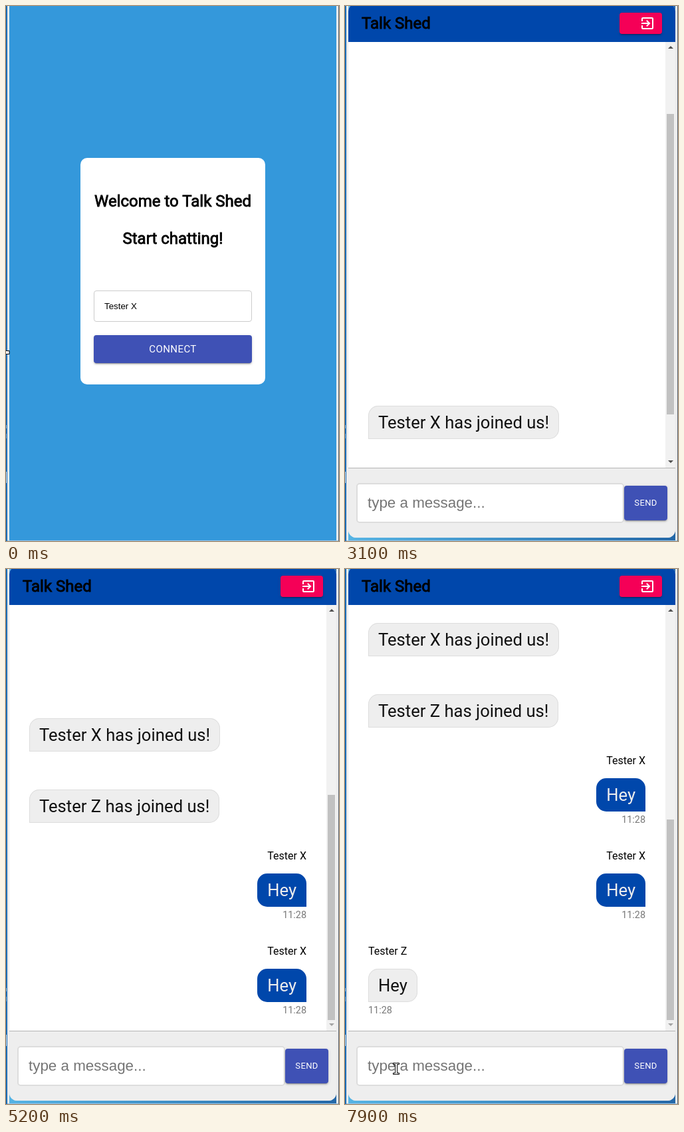
Recreate the animation shown at these times as an HTML page. Size 501 px wide and 803 px high, loop 8000 ms.

```html
<!DOCTYPE html>
<html lang="en">
<head>
<meta charset="utf-8">
<title>Chat demo</title>
<style>
html, body { margin: 0; width: 100%; height: 100%; overflow: hidden; }
#stage { position: relative; width: 501px; height: 803px; overflow: hidden; background: #ececec; font: 16px Roboto, sans-serif; color: #000; }
#stage div, #stage svg { position: absolute; box-sizing: border-box; white-space: pre; }
.page { left: 5px; top: 0; width: 492px; height: 802px; overflow: hidden; }
#welcome { background: #3498db; }
#chat { background: linear-gradient(90deg, #56b4e4, #2468a8); }
.card { left: 107px; top: 228px; width: 278px; height: 340px; border-radius: 10px; background: #fff; }
.head { font-size: 24px; line-height: 28px; -webkit-text-stroke: .85px #000; }
.card .head { width: 100%; text-align: center; }
.field { left: 20px; top: 199px; width: 238px; height: 47px; border: 1px solid #ccc; border-radius: 4px; padding-left: 15px; font: 13.33px/45px "Liberation Sans", Arial, sans-serif; }
.btn { border-radius: 4px; background: #3f51b5; color: #fff; text-align: center; letter-spacing: .02857em;
  box-shadow: 0 3px 1px -2px #0003, 0 2px 2px #00000024, 0 1px 5px #0000001f; }
.btn.hover { box-shadow: 0 2px 4px -1px #0003, 0 4px 5px #00000024, 0 1px 10px #0000001f; }
#connect { left: 20px; top: 266px; width: 238px; height: 42px; font-size: 15px; line-height: 42px; overflow: hidden; }
#ripple { left: 5px; top: -13px; width: 80px; height: 80px; border-radius: 50%; background: #ffffff2e; }
.app { left: 0; top: -4px; width: 492px; height: 802px; border-radius: 12px; overflow: hidden; background: #eee; }
.bar { left: 0; top: 0; width: 100%; height: 58px; background: #0047ab; }
.exit { left: 408px; top: 14px; width: 64px; height: 32px; background: #f50057; }
.view { left: 0; top: 58px; width: 100%; height: 639px; overflow: hidden; background: #fff; }
#list { left: 0; top: 0; width: 477px; }
.msg { left: 30px; }
.msg.own { left: auto; right: 30px; }
.msg div { left: 0; }
.msg.own div { left: auto; right: 0; }
.msg .bubble { position: relative !important; height: 50px; padding: 0 15px; font-size: 25.6px; line-height: 50px; color: #111; background: #eee; border-radius: 15px 15px 15px 0; box-shadow: inset 0 0 0 1px #ddd; }
.msg.own .bubble { color: #eee; background: #0047ab; border-radius: 15px 15px 0 15px; box-shadow: none; }
.name { top: -36px; line-height: 20px; }
.time { top: 53px; font-size: 14.4px; line-height: 20px; color: #777; }
.track { left: 477px; top: 0; width: 15px; height: 639px; background: #f1f1f1; }
#thumb { left: 2px; width: 11px; background: #c1c1c1; }
.arrow { left: 4px; border: 4px solid transparent; }
.up { top: 2px; border-bottom-color: #505050; }
#down { bottom: 3px; border-top-color: #505050; }
.foot { left: 0; top: 697px; width: 100%; height: 105px; background: #eee; border-top: 1px solid #b4b4b4; }
.entry { left: 12px; top: 22px; width: 403px; height: 60px; border: 2px solid #ddd; border-radius: 5px; background: #fff; }
#entry { left: 15px; top: 0; font: 22.4px/56px "Liberation Sans", Arial, sans-serif; }
#caret { top: 15px; width: 1px; height: 25px; background: #000; }
.send { left: 415px; top: 26px; width: 65px; height: 52px; font-size: 13px; line-height: 52px; }
#pointer { left: 0; top: 0; overflow: visible; fill: #fff; stroke: #000; stroke-width: 1; }
</style>
</head>
<body>
<div id="stage">
  <div style="left:0;top:0;width:2px;height:803px;background:#1b6cb5"></div>
  <div style="left:0;top:629px;width:1px;height:5px;background:#8fbce0"></div>
  <div style="left:0;top:642px;width:1px;height:7px;background:#6ba6d6"></div>
  <div style="left:0;top:699px;width:1px;height:17px;background:#d5e5f2"></div>
  <div style="left:500px;top:0;width:1px;height:803px;background:#5a6470"></div>
  <div style="left:2px;top:802px;width:498px;height:1px;background:#9cc4e4"></div>

  <div id="welcome" class="page">
    <div class="card">
      <div class="head" style="top:51px">Welcome to Talk Shed</div>
      <div class="head" style="top:107px">Start chatting!</div>
      <div class="field">Tester X</div>
      <div id="connect" class="btn">CONNECT<div id="ripple"></div></div>
    </div>
  </div>

  <div id="chat" class="page">
    <div class="app">
      <div class="bar">
        <div class="head" style="left:20px;top:16px">Talk Shed</div>
        <div class="btn exit">
          <svg style="left:30px;top:4px" width="24" height="24" fill="#fff"><path d="M10.09 15.59L11.5 17l5-5-5-5-1.41 1.41L12.67 11H3v2h9.67zM19 3H5a2 2 0 0 0-2 2v4h2V5h14v14H5v-4H3v4a2 2 0 0 0 2 2h14a2 2 0 0 0 2-2V5a2 2 0 0 0-2-2z"/></svg>
        </div>
      </div>
      <div class="view">
        <div id="list"></div>
        <div class="track">
          <div class="arrow up"></div>
          <div id="thumb"></div>
          <div id="down" class="arrow"></div>
        </div>
      </div>
      <div class="foot">
        <div class="entry"><div id="entry"></div><div id="caret"></div></div>
        <div class="btn send">SEND</div>
      </div>
    </div>
  </div>

  <svg id="pointer" width="1" height="1"><path id="shape"/></svg>
</div>
<script>
const $ = id => document.getElementById(id);
const LOOP = 8000, TICK = 100, VIEW = 639, TRACK = 607, EMPTY = 646;

// Arrival time, start of the scroll to it, bubble top, height added, text, sender, own message
let total = EMPTY;
const messages = [
  [1700, 1715, 677, 107, 'Tester X has joined us!'],
  [3100, 3057, 784, 107, 'Tester Z has joined us!'],
  [4600, 4600, 910, 143, 'Hey', 'Tester X', true],
  [4700, 4700, 1053, 143, 'Hey', 'Tester X', true],
  [6800, 6740, 1196, 143, 'Hey', 'Tester Z', false]
].map(([at, start, top, height, text, name, own]) => {
  const el = document.createElement('div');
  el.className = own ? 'msg own' : 'msg';
  el.style.top = top + 'px';
  el.innerHTML = `<div class="bubble">${text}</div>` +
    (name ? `<div class="name">${name}</div><div class="time">11:28</div>` : '');
  $('list').append(el);
  total += height;
  return { at, start, total, el };
});

const shapes = {
  resize: 'M-6 -2.5H5V2.5H-6Z',
  arrow: 'M.5 .5V17.8L4.4 14.2L7.2 20.3L9.8 19.2L7.2 13.2H12.4Z',
  hand: 'M4 10V2Q4 .5 5.5 .5T7 2V8Q9 6.8 10 8.5Q12 7.5 13 9.5Q15 8.8 15.5 11V15Q15 17 13.5 20H6.5Q5 17 1 13Q.5 10.5 4 13Z',
  beam: 'M-4.5 -8.5H-1L0 -8L1 -8.5H4.5V-6.5H1.5V6.5H4.5V8.5H1L0 8L-1 8.5H-4.5V6.5H-1.5V-6.5H-4.5Z'
};
// From, until, shape, path of [time, x, y]
const pointers = [
  [0, 300, 'resize', [[0, 0, 520]]],
  [300, 400, 'arrow', [[300, 60, 534]]],
  [400, 1700, 'hand', [[400, 150, 525], [500, 172, 521]]],
  [1700, 2200, 'arrow', [[1700, 177, 521]]],
  [3400, 5200, 'beam', [[3400, 120, 752], [3500, 173, 757], [5000, 173, 757], [5100, 110, 752]]],
  [7800, LOOP, 'beam', [[7800, 57, 750], [7900, 77, 750]]]
];

function along(keys, t, i) {
  const n = keys.findIndex(k => k[0] > t);
  if (n < 0) return keys[keys.length - 1][i];
  if (n === 0) return keys[0][i];
  const a = keys[n - 1], b = keys[n];
  return a[i] + (b[i] - a[i]) * (t - a[0]) / (b[0] - a[0]);
}

const ease = p => p * p * (3 - 2 * p);
const ramp = (elapsed, span) => ease(Math.min(1, Math.max(0, elapsed / span)));
const show = (el, on) => { el.style.visibility = on ? 'visible' : 'hidden'; };

// A smooth scroll lasts longer the farther it goes
function glide(from, to, elapsed) {
  const span = Math.sqrt(Math.abs(to - from)) / 60 * 1000 || 1;
  return from + (to - from) * ramp(elapsed, span);
}

// Each new message restarts the scroll from wherever it has got to
function scrollAt(t) {
  let from = 0, to = 0, start = 0;
  for (const m of messages) {
    if (m.start > t) break;
    from = glide(from, to, m.start - start);
    to = m.total - VIEW;
    start = m.start;
  }
  return glide(from, to, t - start);
}

function drawList(t) {
  let height = EMPTY;
  for (const m of messages) {
    const here = t >= m.at;
    m.el.style.display = here ? '' : 'none';
    if (here) height = m.total;
  }
  const scroll = scrollAt(t);
  $('list').style.top = -Math.round(scroll) + 'px';
  $('thumb').style.top = Math.round(16 + scroll / height * TRACK) + 'px';
  $('thumb').style.height = Math.round(VIEW / height * TRACK) + 'px';
  $('down').style.borderTopColor = scroll >= height - VIEW ? '#a3a3a3' : '#505050';
}

function drawEntry(t) {
  const typed = t < 4100 || t >= 4500 ? '' : t < 4300 ? 'H' : 'Hey';
  $('entry').textContent = typed || 'type a message...';
  $('entry').style.color = typed ? '#000' : '#757575';
  $('caret').style.left = 15 + (typed ? $('entry').offsetWidth : 0) + 'px';
  $('caret').style.display = t >= 3500 && t < 5000 ? '' : 'none';
}

function drawConnect(t) {
  $('connect').classList.toggle('hover', t >= 500);
  $('connect').style.backgroundColor = `color-mix(in srgb, #303f9f ${100 * ramp(t - 400, 250)}%, #3f51b5)`;
  $('ripple').style.display = t >= 1600 ? '' : 'none';
}

function drawPointer(t) {
  const p = pointers.find(([from, until]) => t >= from && t < until);
  show($('pointer'), p);
  if (!p) return;
  const x = Math.round(along(p[3], t, 1)), y = Math.round(along(p[3], t, 2));
  $('shape').setAttribute('d', shapes[p[2]]);
  $('shape').setAttribute('transform', `translate(${x} ${y})`);
}

function draw(now) {
  const t = Math.floor(now % LOOP / TICK) * TICK;
  const chatting = t >= 1700;
  show($('welcome'), !chatting);
  show($('chat'), chatting);
  drawConnect(t);
  drawList(t);
  drawEntry(t);
  drawPointer(t);
  requestAnimationFrame(draw);
}
draw(performance.now());
</script>
</body>
</html>
```
